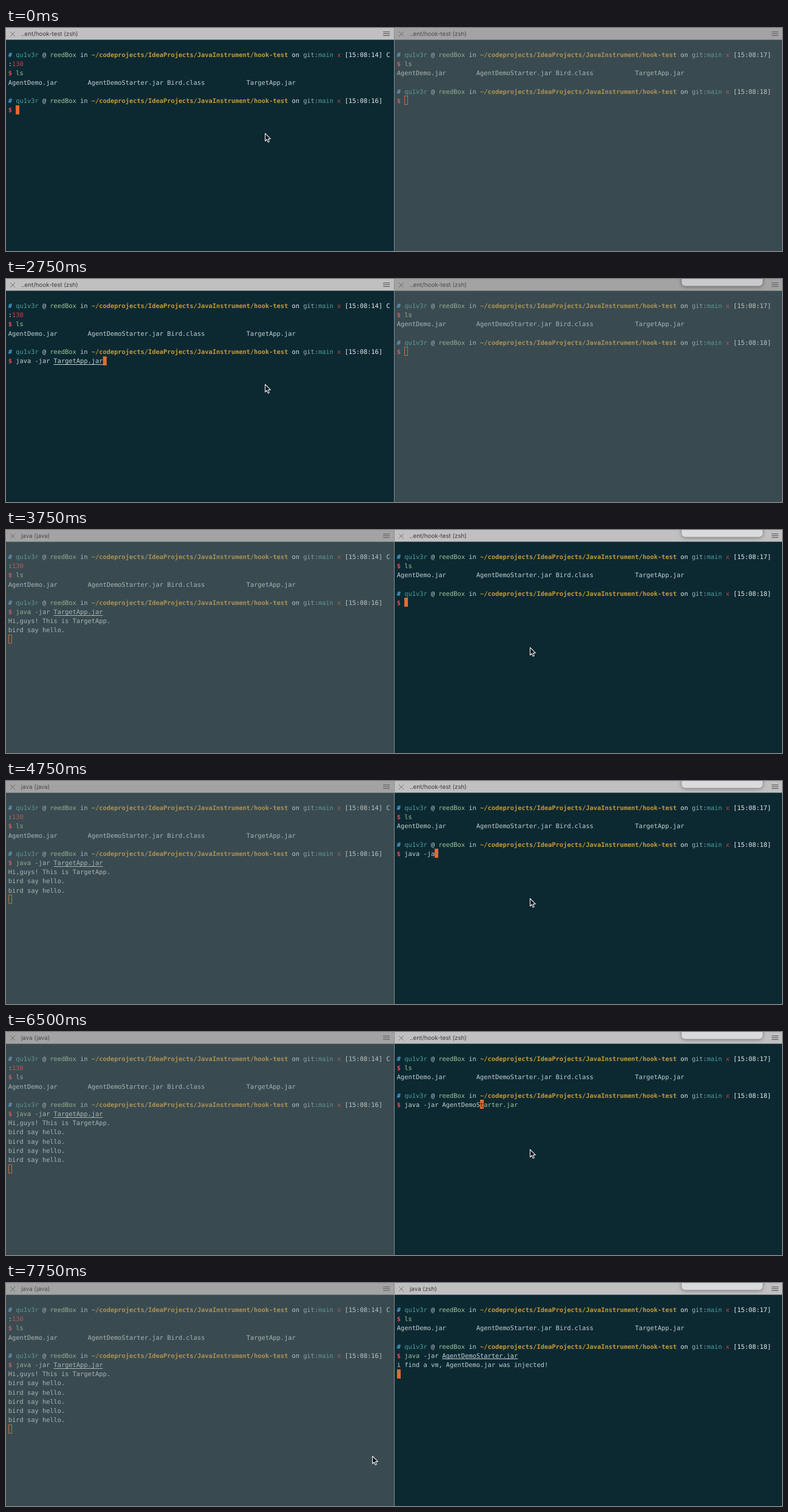
These frames come from a looping animation (1280x369 px, 8 s). An HTML page with a canvas:

```html
<!DOCTYPE html>
<html lang="en">
<head>
<meta charset="utf-8">
<title>Two terminal panes</title>
<style>
  html, body { margin: 0; width: 100%; height: 100%; overflow: hidden; background: #0c2932; }
  canvas { display: block; width: 1280px; height: 369px; }
</style>
</head>
<body>
<canvas id="stage" width="1280" height="369"></canvas>
<script>
const ctx = document.getElementById('stage').getContext('2d');
ctx.textRendering = 'geometricPrecision';

const LOOP = 8000, STEP = 250;
const COL = 6.235, ROW = 15.17, TOP = 36.6, BAR = 19;
const MONO = '10.35px "DejaVu Sans Mono", monospace';
const C = {
  bg: '#0c2932', text: '#c3d1d1', white: '#e6eceb', blue: '#4ba3dc', git: '#93b2bd',
  cyan: '#4a9f9b', green: '#9cc795', yellow: '#c89a36', red: '#d2403b', prompt: '#ee4550',
  cursor: '#e8692c'
};
const USER = 'qu1v3r', HOST = 'reedBox';
const FILES = 'AgentDemo.jar        AgentDemoStarter.jar Bird.class           TargetApp.jar';
const HELLO = 'bird say hello.';

// A run is [text, colour, style]; style is 'b' for bold, 'u' for underlined.
const run = (text, color = C.text, style = '') => [text, color, style];
const promptLine = (time, ...tail) => [
  run('# ', C.blue, 'b'), run(USER + ' ', C.cyan), run('@ '), run(HOST + ' ', C.green), run('in '),
  run('~/codeprojects/IdeaProjects/JavaInstrument/hook-test', C.yellow, 'b'),
  run(' on ', C.white), run('git:', C.git), run('main ', C.cyan), run('x ', C.red),
  run('[' + time + ']', C.white), ...tail
];
const commandLine = (...runs) => [run('$ ', C.prompt, 'b'), ...runs];
const lsLine = commandLine(run('ls', C.green));

// Latest value whose start time has been reached.
const at = (t, keys) => keys.reduce((value, [start, next]) => t >= start ? next : value, keys[0][1]);

function javaCommand(typed, file, complete, entered) {
  if (!complete) return commandLine(run(typed));
  return commandLine(run('java', entered ? C.green : C.text), run(' -jar '), run(file, C.text, 'u'));
}

function leftPane(t) {
  const entered = t >= 3000;
  const typed = at(t, [[0, ''], [750, 'j'], [1000, 'java'], [1250, 'java -'],
    [1500, 'java -jar '], [1750, 'java -jar T'], [2000, 'java -jar TargetApp.jar']]);
  const lines = [
    promptLine('15:08:14', run(' C', C.white)),
    [run(':', C.white), run('130', C.red)],
    lsLine, [run(FILES)], [],
    promptLine('15:08:16'),
    javaCommand(typed, 'TargetApp.jar', t >= 2000, entered)
  ];
  let cursor = [2 + typed.length, 6];
  if (t === 1500) lines.push([run(FILES)]);
  if (t >= 3250) {
    lines.push([run('Hi,guys! This is TargetApp.')]);
    const count = 1 + Math.floor((t - 3250) / 1000);
    for (let i = 0; i < count; i++) lines.push([run(HELLO)]);
  }
  if (entered) cursor = [0, lines.length];
  const title = at(t, [[0, '..ent/hook-test (zsh)'], [3000, 'java (zsh)'], [3750, 'java (java)']]);
  return { x: 0, w: 640, origin: 3.8, close: 11, title, lines, cursor, active: t < 3750 };
}

function rightPane(t) {
  const entered = t >= 7250;
  const typed = at(t, [[0, ''], [4000, 'j'], [4250, 'java'], [4500, 'java -'], [4750, 'java -ja'],
    [5000, 'java -jar '], [5250, 'java -jar A'], [5500, 'java -jar AgentDemo'],
    [6500, 'java -jar AgentDemoS'], [6750, 'java -jar AgentDemoStarter.jar']]);
  const command = javaCommand(typed, 'AgentDemoStarter.jar', t >= 6750, entered);
  const hinted = t === 6500;
  if (hinted) command.push(run('tarter.jar', C.green));
  const lines = [promptLine('15:08:17'), lsLine, [run(FILES)], [], promptLine('15:08:18'), command];
  if (t >= 7750) lines.push([run('i find a vm, AgentDemo.jar was injected!')]);
  const cursor = entered ? [0, lines.length] : [2 + typed.length, 5];
  return {
    x: 641, w: 639, origin: 644.8, close: 652, lines, cursor, active: t >= 3750,
    title: entered ? 'java (zsh)' : '..ent/hook-test (zsh)', under: hinted ? 't' : ''
  };
}

function rect(x, y, w, h, color) {
  ctx.fillStyle = color;
  ctx.fillRect(x, y, w, h);
}

function glyph(ch, x, row) {
  ctx.fillText(ch, x, Math.round(TOP + row * ROW + 11.5));
}

function drawLine(runs, origin, row) {
  let col = 0;
  for (const [text, color, style] of runs) {
    ctx.font = (style === 'b' ? 'bold ' : '') + MONO;
    ctx.fillStyle = color;
    const start = origin + col * COL;
    for (const ch of text) {
      if (ch !== ' ') glyph(ch, origin + col * COL, row);
      col++;
    }
    if (style === 'u') rect(start, Math.round(TOP + row * ROW + 13), text.length * COL, 1, color);
  }
}

function drawCursor({ cursor: [col, row], origin, active, under }) {
  const x = Math.round(origin + col * COL), y = Math.round(TOP + row * ROW);
  if (active) {
    rect(x, y, 6, 15, C.cursor);
    if (under) {
      ctx.font = MONO;
      ctx.fillStyle = C.bg;
      glyph(under, origin + col * COL, row);
    }
  } else {
    ctx.strokeStyle = '#c06f42';
    ctx.lineWidth = 1;
    ctx.strokeRect(x + 0.5, y + 0.5, 5, 14);
  }
}

function drawBar({ x, w, close, title, active }) {
  rect(x, 0, w, BAR, active ? '#c0c0c0' : '#a3a3a3');
  rect(x, BAR, w, 1, active ? '#59686d' : '#6d777a');
  ctx.strokeStyle = active ? '#757575' : '#6b6b6b';
  ctx.lineWidth = 1;
  ctx.beginPath();
  for (const s of [-1, 1]) {
    ctx.moveTo(close - 4, 10 - 4 * s);
    ctx.lineTo(close + 4, 10 + 4 * s);
  }
  ctx.stroke();
  ctx.font = '9.75px Inter, sans-serif';
  ctx.fillStyle = active ? '#3a3a3a' : '#4b4b4b';
  ctx.fillText(title, close + 14, 13);
  for (const y of [6, 9, 12]) rect(close + 611, y, 11, 1, active ? '#505050' : '#5c5c5c');
}

function drawPane(pane) {
  rect(pane.x, 0, pane.w, 369, C.bg);
  pane.lines.forEach((line, row) => drawLine(line, pane.origin, row));
  if (!pane.active) rect(pane.x, BAR, pane.w, 350, 'rgba(131,131,131,0.385)');
  drawCursor(pane);
  drawBar(pane);
}

function drawPopup(active) {
  ctx.save();
  ctx.shadowColor = 'rgba(0,0,0,0.4)';
  ctx.shadowBlur = 6;
  ctx.shadowOffsetY = 1;
  ctx.fillStyle = active ? '#dadbdc' : '#c8cacb';
  ctx.beginPath();
  ctx.roundRect(1114.5, -20, 133.5, 31.5, 6);
  ctx.fill();
  ctx.restore();
}

function drawPointer(t) {
  const k = Math.min(1, Math.max(0, (t - 3000) / 500));
  const [x, y] = t >= 7750 ? [604.5, 286] : [427.5 + 437 * k, 174 + 20 * k];
  ctx.save();
  ctx.translate(x, y);
  ctx.beginPath();
  [[0, 0.5], [0, 13], [2.8, 10.4], [4.8, 15], [6.8, 14.1], [4.9, 9.6], [8.8, 9.4]]
    .forEach(([px, py]) => ctx.lineTo(px, py));
  ctx.closePath();
  ctx.lineJoin = 'round';
  ctx.lineWidth = 1.1;
  ctx.fillStyle = '#0a0f12';
  ctx.strokeStyle = '#f2f2f2';
  ctx.fill();
  ctx.stroke();
  ctx.restore();
}

function draw(t) {
  const right = rightPane(t);
  drawPane(leftPane(t));
  drawPane(right);
  rect(640, 0, 1, 369, '#869093');
  if (t >= 2000) drawPopup(right.active);
  drawPointer(t);
}

const begin = performance.now();
function tick() {
  const t = (performance.now() - begin) % LOOP;
  draw(Math.floor(t / STEP) * STEP);
  requestAnimationFrame(tick);
}
tick();
</script>
</body>
</html>
```
